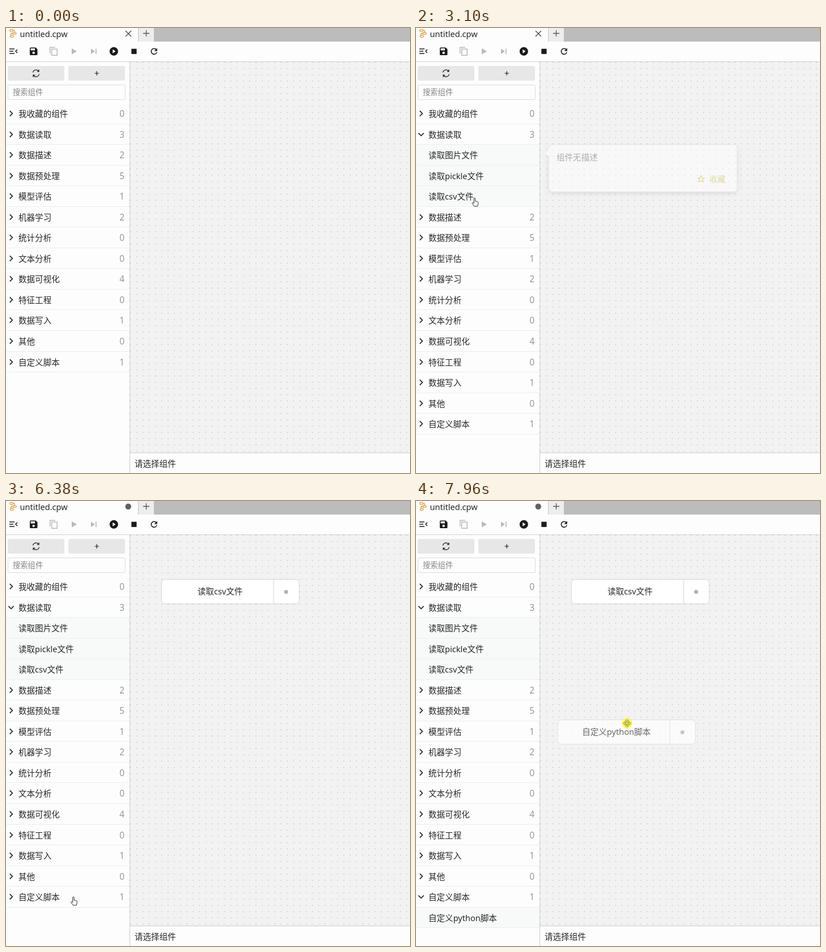
An HTML page with a canvas for the animation above (8000 ms loop, 713x786 px).

```html
<!DOCTYPE html>
<html lang="zh-CN">
<head>
<meta charset="utf-8">
<title>untitled.cpw</title>
<style>
html, body { margin: 0; width: 100%; height: 100%; overflow: hidden; background: #fff; }
#stage {
  position: relative; width: 713px; height: 786px; overflow: hidden; background: #fdfdfd;
  font: 14.55px/1 "Noto Sans", "Noto Sans CJK SC", "Noto Sans CJK", sans-serif; color: #262626;
}
#stage > * { position: absolute; box-sizing: border-box; }
.label { line-height: 20px; white-space: nowrap; }
svg { overflow: visible; }

/* frame */
#strip { left: 0; top: 0; width: 713px; height: 24px; background: linear-gradient(90deg, #fdfdfd 233px, #c4c4c4 233px 234px, #ededed 234px 261px, #bcbcbc 261px); }
#tools { left: 0; top: 24px; width: 713px; height: 36px; border-bottom: 1px solid #d2d2d2; }
#board { left: 219px; top: 60px; background: #f2f2f2; }
#foot { left: 218px; top: 750px; width: 495px; height: 36px; padding-left: 8px; line-height: 36px; background: #fdfdfd; border: solid #cbcbcb; border-width: 1px 0 0 1px; }
#edge { left: 218px; top: 60px; width: 1px; height: 691px; background: #cfcfcf; }
.btn { top: 67px; width: 100px; height: 26px; background: #e7e7e7; border-radius: 3px; }
#search { left: 3px; top: 100px; width: 208px; height: 27px; padding-left: 8px; border: 1px solid #dcdcdf; border-radius: 3px; font-size: 13.3px; line-height: 24px; color: #858585; }

/* component list */
#list { left: 0; top: 133px; width: 218px; }
.row { position: relative; box-sizing: border-box; height: 36.55px; padding-left: 22px; line-height: 36px; border-bottom: 1px solid #ededef; white-space: nowrap; }
.row b { position: absolute; right: 9px; font-weight: 400; font-size: 15.5px; color: #969799; }
.row svg { position: absolute; left: 9px; top: 18px; width: 1px; height: 1px; }
.subs { height: 0; overflow: hidden; background: #f8f9f9; }

/* timeline */
.move { animation: 8s linear infinite; }
.flip { animation: 8s step-end infinite; }
#subs1 { animation-name: open1; }
#subs12 { animation-name: open2; }
#chev1 { animation-name: turn1; }
#chev12 { animation-name: turn2; }
#close { animation-name: clean; }
#dirty { animation-name: dirty; }
@keyframes open1 { 0%, 22.125% { height: 0; animation-timing-function: ease } 24.625%, 100% { height: 109.65px } }
@keyframes turn1 { 0%, 22.125% { transform: none } 24.625%, 100% { transform: rotate(90deg) } }
@keyframes open2 { 0%, 81.375% { height: 0; animation-timing-function: ease } 84%, 100% { height: 36.55px } }
@keyframes turn2 { 0%, 81.375% { transform: none } 84%, 100% { transform: rotate(90deg) } }
@keyframes clean { 0% { opacity: 1 } 55.875%, 100% { opacity: 0 } }
@keyframes dirty { 0% { opacity: 0 } 55.875%, 100% { opacity: 1 } }

/* tooltips */
.tip { left: 235px; width: 331px; height: 82px; background: #fff; border-radius: 6px; box-shadow: 0 3px 12px rgba(0,0,0,.2); color: #696969; opacity: 0; }
.tip::before { content: ""; position: absolute; left: -5px; top: var(--arrow, 8px); width: 10px; height: 10px; background: #fff; transform: rotate(45deg); }
.tip span { position: absolute; left: 13px; top: 11px; }
.tip em { position: absolute; left: 283px; top: 50px; font-style: normal; font-size: 14px; color: #c9c445; }
.tip svg { position: absolute; left: 267.5px; top: 60px; width: 1px; height: 1px; }
#tipA { top: 207px; animation-name: tipA; }
#tipB { top: 280px; animation-name: tipB; }
#tipC { top: 701px; --arrow: 26px; animation-name: tipC; }
@keyframes tipA { 0%, 31.5% { opacity: 0 } 33.5%, 38% { opacity: 1 } 39.5%, 100% { opacity: 0 } }
@keyframes tipB { 0%, 40.5% { opacity: 0 } 42.5%, 48.5% { opacity: 1 } 50%, 100% { opacity: 0 } }
@keyframes tipC { 0%, 87% { opacity: 0 } 88.8%, 91.4% { opacity: 1 } 93%, 100% { opacity: 0 } }

/* nodes */
.node { left: 0; top: 0; width: 244px; height: 44px; background: #fff; border: 1px solid #d3d5da; border-radius: 7px; opacity: 0; }
.node span { position: absolute; left: 3px; width: 200px; text-align: center; line-height: 41px; white-space: nowrap; }
.node i { position: absolute; left: 197px; top: 0; height: 42px; border-left: 1px solid #d3d5da; }
.node i::after { content: ""; position: absolute; left: 18px; top: 17.5px; width: 7px; height: 7px; border-radius: 50%; background: #b2b2b2; }
.node svg { position: absolute; left: -1px; top: -1px; }
#csv { animation: csvMove 8s linear infinite, csvShow 8s step-end infinite; }
#py { animation: pyMove 8s linear infinite, pyShow 8s step-end infinite; }
#ports { animation-name: ports; }
@keyframes csvMove {
  0%, 48.375% { transform: translate(-18px, 283px); animation-timing-function: cubic-bezier(.3, .3, .5, 1) }
  52.625%, 64.25% { transform: translate(229px, 149px); animation-timing-function: ease-in-out }
  68.25%, 100% { transform: translate(273.8px, 138px) }
}
@keyframes csvShow { 0% { opacity: 0 } 46.75% { opacity: .68 } 55.875%, 100% { opacity: 1 } }
@keyframes ports { 0% { opacity: 0 } 55.875% { opacity: 1 } 69.6%, 100% { opacity: 0 } }
@keyframes pyMove {
  0%, 90.5% { transform: translate(-21px, 720px); animation-timing-function: ease-in }
  93.625% { transform: translate(186px, 549px) }
  94.5% { transform: translate(201px, 512px); animation-timing-function: cubic-bezier(.2, .4, .5, 1) }
  99.5%, 100% { transform: translate(249.6px, 386px) }
}
@keyframes pyShow { 0% { opacity: 0 } 90.5%, 100% { opacity: .68 } }

/* pointer */
#pointer { left: 0; top: 0; width: 1px; height: 1px; animation-name: path; }
#arrow { animation-name: arrow; }
#hand { animation-name: hand; }
#drag { animation-name: drag; }
#press { animation-name: press; }
@keyframes path {
  0%, 2.25% { transform: translate(658px, 770px) }
  8% { transform: translate(222px, 300px); animation-timing-function: ease-out }
  11.75%, 12% { transform: translate(142px, 208px); animation-timing-function: ease-in-out }
  15.25%, 27.875% { transform: translate(107px, 190.5px); animation-timing-function: ease-in-out }
  31%, 34.5% { transform: translate(105px, 227px); animation-timing-function: ease-in-out }
  37.125% { transform: translate(104px, 298px) }
  40%, 46.5% { transform: translate(103px, 302px); animation-timing-function: ease-in }
  48.375% { transform: translate(133.5px, 301.5px); animation-timing-function: cubic-bezier(.2, .4, .5, 1) }
  52.3%, 64.25% { transform: translate(350px, 168px); animation-timing-function: ease-in-out }
  68.1%, 68.75% { transform: translate(395px, 157px) }
  73.625%, 74% { transform: translate(142px, 424px); animation-timing-function: ease-in-out }
  79.5%, 84.3% { transform: translate(119px, 699.5px); animation-timing-function: ease-in-out }
  87%, 90% { transform: translate(100px, 738px); animation-timing-function: ease-in }
  93.625% { transform: translate(312px, 550.5px) }
  94.5% { transform: translate(323px, 515px); animation-timing-function: cubic-bezier(.2, .4, .5, 1) }
  99.5%, 100% { transform: translate(372.5px, 392.5px) }
}
@keyframes arrow { 0% { opacity: 0 } 2.25% { opacity: 1 } 8% { opacity: 0 } 60.875% { opacity: 1 } 72.2%, 100% { opacity: 0 } }
@keyframes hand { 0% { opacity: 0 } 8% { opacity: 1 } 46.5% { opacity: 0 } 72.2% { opacity: 1 } 90%, 100% { opacity: 0 } }
@keyframes drag { 0% { opacity: 0 } 46.5% { opacity: 1 } 60.875% { opacity: 0 } 90%, 100% { opacity: 1 } }
@keyframes press {
  0% { opacity: 0 } 22.125% { opacity: 1 } 23.75% { opacity: 0 }
  45% { opacity: 1 } 56.875% { opacity: 0 } 64.25% { opacity: 1 } 68.3% { opacity: 0 }
  81.375% { opacity: 1 } 82.5% { opacity: 0 } 89.4%, 100% { opacity: 1 }
}
</style>
</head>
<body>
<div id="stage">
  <div id="strip"></div>
  <div id="tools"></div>
  <canvas id="board" width="494" height="690"></canvas>
  <div id="foot">请选择组件</div>
  <div id="edge"></div>
  <div class="btn" style="left:3px"></div>
  <div class="btn" style="left:110px"></div>
  <div id="search">搜索组件</div>
  <div class="label" style="left:24.5px;top:0">untitled.cpw</div>
  <div id="list"></div>

  <svg style="left:0;top:0" width="713" height="130" fill="none" stroke="#1a1a1a" stroke-width="1.5">
    <g stroke="#dc9a3c" stroke-width="1.3">
      <rect x="6.7" y="2.7" width="5.6" height="3.4" rx="1.5"/>
      <rect x="12.4" y="7.8" width="5.6" height="3.4" rx="1.5"/>
      <rect x="7.4" y="12.9" width="5.6" height="3.4" rx="1.5"/>
      <path d="M12.3 4.4H15v3.4M12.4 9.5H9v3.4"/>
    </g>
    <path id="close" class="flip" stroke="#444" stroke-width="1.3" d="m211 5 10 10m0-10-10 10"/>
    <circle id="dirty" class="flip" cx="215.7" cy="9.7" r="5.2" fill="#606060" stroke="none"/>
    <path stroke="#555" stroke-width="1.3" d="M242 9.5h11M247.500 4v11"/>
    <path d="M6 37h9M6 41h7M6 45h9M20 38l-3 3 3 3"/>
    <g fill="#1a1a1a" stroke="none">
      <path fill-rule="evenodd" d="M43.500 34.500h9l3 3v9a1.500 1.500 0 0 1-1.500 1.500H43.500a1.500 1.500 0 0 1-1.500-1.500V36a1.500 1.500 0 0 1 1.500-1.500zM43.500 36v3.500h7.500V36zM48.700 41.700a2.200 2.200 0 1 0 .01 0z"/>
      <path fill="#b9b9b9" d="m116 36 9 5.300-9 5.300zM150 36.500l6.800 4.700-6.800 4.700zM158 36.500h1.700v9.400H158z"/>
      <path fill-rule="evenodd" d="M190.300 33.700a7.500 7.500 0 1 0 .01 0zM188.300 37.700l5 3.500-5 3.500z"/>
      <path d="M221.300 36.700h9.200v9.200h-9.200z"/>
      <path d="M266.800 35.500v5.200h-5.200z"/>
    </g>
    <path stroke="#b9b9b9" d="M77.700 45V34.200H87M80.700 37.200h9.500v11h-9.500z"/>
    <path stroke-width="1.600" d="M265.300 38.200a5 5 0 1 0 .9 4.400"/>
    <path stroke-width="1.300" d="M47.500 78.500a5.600 5.600 0 0 1 10-2.300M58.500 81.500a5.600 5.600 0 0 1-10 2.300M58 73.500v3.300h-3.300M48 86.500v-3.300h3.300"/>
    <path stroke-width="1.200" d="M156.500 80h7.400M160.200 76.300v7.400"/>
  </svg>

  <div id="tipA" class="tip move"></div>
  <div id="tipB" class="tip move"></div>
  <div id="tipC" class="tip move"></div>

  <div id="csv" class="node"><span>读取csv文件</span><i></i>
    <svg id="ports" class="flip" width="244" height="44" fill="#f6f7f9" stroke="#b3b9c6" stroke-width="1.300">
      <circle cy="22" r="4.600"/><circle cx="244" cy="22" r="4.600"/>
      <circle cx="122" r="4.600"/><circle cx="122" cy="44" r="4.600"/>
    </svg>
  </div>
  <div id="py" class="node"><span>自定义python脚本</span><i></i></div>

  <svg id="pointer" class="move" fill="#fff" stroke="#222">
    <circle id="press" class="flip" r="9.300" fill="#ff0" fill-opacity=".62" stroke="none"/>
    <path id="arrow" class="flip" stroke-width=".9" d="M0 0v12l2.800-2.600 1.900 4.300 2-.9-1.900-4.200h3.700z"/>
    <path id="hand" class="flip" stroke-width="1" d="M-1.200 1a1.200 1.200 0 0 1 2.400 0v4.600l3.800.8q1.700.4 1.500 2.100l-.6 3.400-.8 2.600h-5.600l-3.600-4.900q-.6-1.200.6-1.500 1 0 2.300 1.400z"/>
    <path id="drag" class="flip" fill="#f5f294" stroke="#7d7725" stroke-width=".9" d="M0-7 3-4H1V-1H4V-3L7 0 4 3V1H1V4H3L0 7-3 4H-1V1H-4V3L-7 0-4-3V-1H-1V-4H-3Z"/>
  </svg>
</div>
<script>
const $ = id => document.getElementById(id);

const groups = [
  ['我收藏的组件', 0], ['数据读取', 3, ['读取图片文件', '读取pickle文件', '读取csv文件']],
  ['数据描述', 2], ['数据预处理', 5], ['模型评估', 1], ['机器学习', 2], ['统计分析', 0],
  ['文本分析', 0], ['数据可视化', 4], ['特征工程', 0], ['数据写入', 1], ['其他', 0],
  ['自定义脚本', 1, ['自定义python脚本']]
];
const row = (name, extra = '') => `<div class="row">${name}${extra}</div>`;
$('list').innerHTML = groups.map(([name, count, subs], i) => {
  const chevron = `<svg fill="none" stroke="#222" stroke-width="1.7"><path id="chev${i}" class="move" d="M-2.300-4.600 2.300 0-2.300 4.600"/></svg>`;
  const items = subs ? `<div id="subs${i}" class="subs move">${subs.map(s => row(s)).join('')}</div>` : '';
  return row(name, `${chevron}<b>${count}</b>`) + items;
}).join('');

const star = Array.from({ length: 10 }, (_, i) => {
  const r = i % 2 ? 2.7 : 6.3, a = i * Math.PI / 5;
  return `${(r * Math.sin(a)).toFixed(2)},${(-r * Math.cos(a)).toFixed(2)}`;
}).join(' ');
document.querySelectorAll('.tip').forEach(tip => {
  tip.innerHTML = `<span class="label">组件无描述</span><svg fill="none" stroke="#c9c445" stroke-width="1.2"><polygon points="${star}"/></svg><em class="label">收藏</em>`;
});

// dotted grid
const ctx = $('board').getContext('2d'), pitch = 11.08;
ctx.fillStyle = '#a2a2a2';
for (let y = 0; y < 690; y += pitch)
  for (let x = 0; x < 494; x += pitch) ctx.fillRect(x, y, 1.1, 1.1);
</script>
</body>
</html>
```
